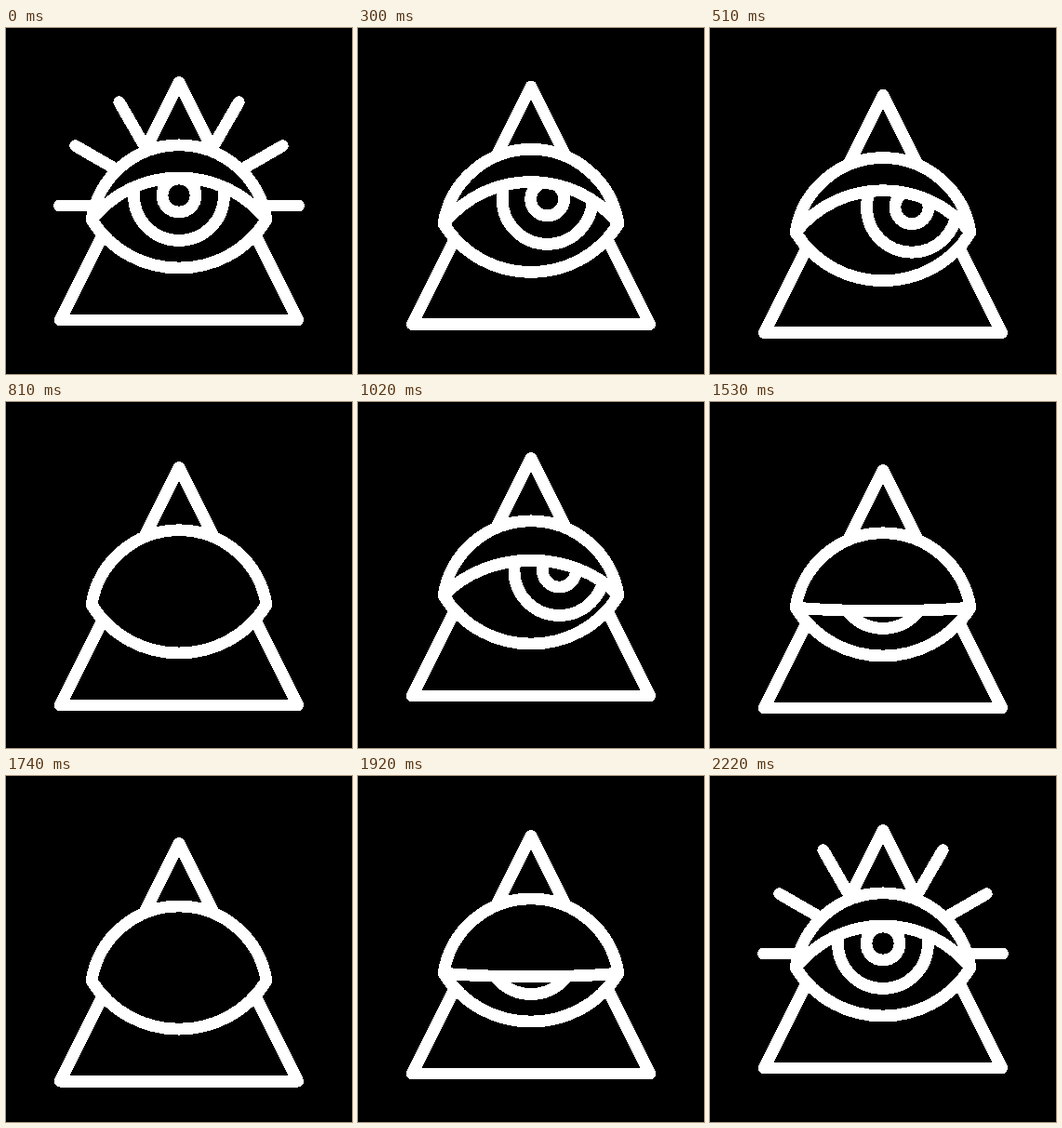
Write an HTML page that moves like this. It is 372 px wide and 372 px high and loops after 2250 ms.

```html
<!DOCTYPE html>
<html lang="en">
<head>
<meta charset="utf-8">
<title>Watching eye</title>
<style>
  html, body { margin: 0; width: 100%; height: 100%; overflow: hidden; background: #000; }
  svg { display: block; width: 100%; height: 100%; shape-rendering: crispEdges; }
  .line { fill: none; stroke: #fff; stroke-width: 12.8; stroke-linecap: round; stroke-linejoin: round; }
</style>
</head>
<body>
<svg viewBox="0 0 372 372">
  <defs><clipPath id="opening"><path id="gap"/></clipPath></defs>
  <g id="body" class="line">
    <g id="rays"></g>
    <path d="M186 58.5L313.7 314H58.3Z"/>
    <path id="ball" fill="#000" stroke="none"/>
    <g clip-path="url(#opening)">
      <g id="iris">
        <circle cx="186" cy="180" r="48.5"/>
        <circle cx="186" cy="180" r="18"/>
      </g>
    </g>
    <path id="lid"/>
    <path id="outline"/>
  </g>
</svg>
<script>
const LOOP = 2250, STEP = 30;
const $ = id => document.getElementById(id);

// Keys are [step, value] pairs, eased between neighbours.
const BOB = [[4, 0], [21.5, 16.4], [37.5, 0], [54, 16.4], [71, 0]];
const GAZE = [[4, 0], [15, 31], [33, 31], [45.5, 0]];
const BLINK = [[20, 0], [26, 1], [29, 1], [35, 0], [48, 0], [54, 1], [61, 1], [67, 0]];
const RAYS = [[0, 1], [8, 0], [66, 0], [74, 1]];

function at(keys, s) {
  if (s <= keys[0][0]) return keys[0][1];
  for (let i = 1; i < keys.length; i++) {
    const [a, from] = keys[i - 1], [b, to] = keys[i];
    if (s <= b) {
      const u = (s - a) / (b - a);
      return from + (to - from) * u * u * (3 - 2 * u);
    }
  }
  return keys[keys.length - 1][1];
}

// Curve between the eye corners; k runs from open lid (0) to lower rim (1).
function curve(k) {
  const dx = 48.4 - 4.9 * k, y = 146 + 129.4 * k;
  return { right: `C${92 + dx} ${y} ${280 - dx} ${y} 280 206`,
           left: `C${280 - dx} ${y} ${92 + dx} ${y} 92 206` };
}

const start = 'M92 206';
const rim = start + 'A95.2 95.2 0 0 1 280 206' + curve(1).left + 'Z';
$('ball').setAttribute('d', rim);
$('outline').setAttribute('d', rim);

const rays = [0, 30, 60, 120, 150, 180].map(deg => {
  const line = document.createElementNS('http://www.w3.org/2000/svg', 'line');
  const a = deg * Math.PI / 180;
  $('rays').append(line);
  return { line, x: Math.cos(a), y: -Math.sin(a) };
});

function draw(now) {
  const s = Math.floor((now % LOOP) / STEP);
  const gaze = at(GAZE, s), lid = curve(at(BLINK, s)), reach = 60 + 68.5 * at(RAYS, s);
  $('body').setAttribute('transform', `translate(0 ${at(BOB, s)})`);
  $('iris').setAttribute('transform', `translate(${gaze} ${-gaze / 31})`);
  $('lid').setAttribute('d', start + lid.right);
  $('gap').setAttribute('d', start + lid.right + curve(1).left + 'Z');
  for (const { line, x, y } of rays) {
    line.setAttribute('x1', 186 + 60 * x);
    line.setAttribute('y1', 191 + 60 * y);
    line.setAttribute('x2', 186 + reach * x);
    line.setAttribute('y2', 191 + reach * y);
  }
}

const begin = performance.now();
function tick() {
  draw(performance.now() - begin);
  requestAnimationFrame(tick);
}
tick();
</script>
</body>
</html>
```
